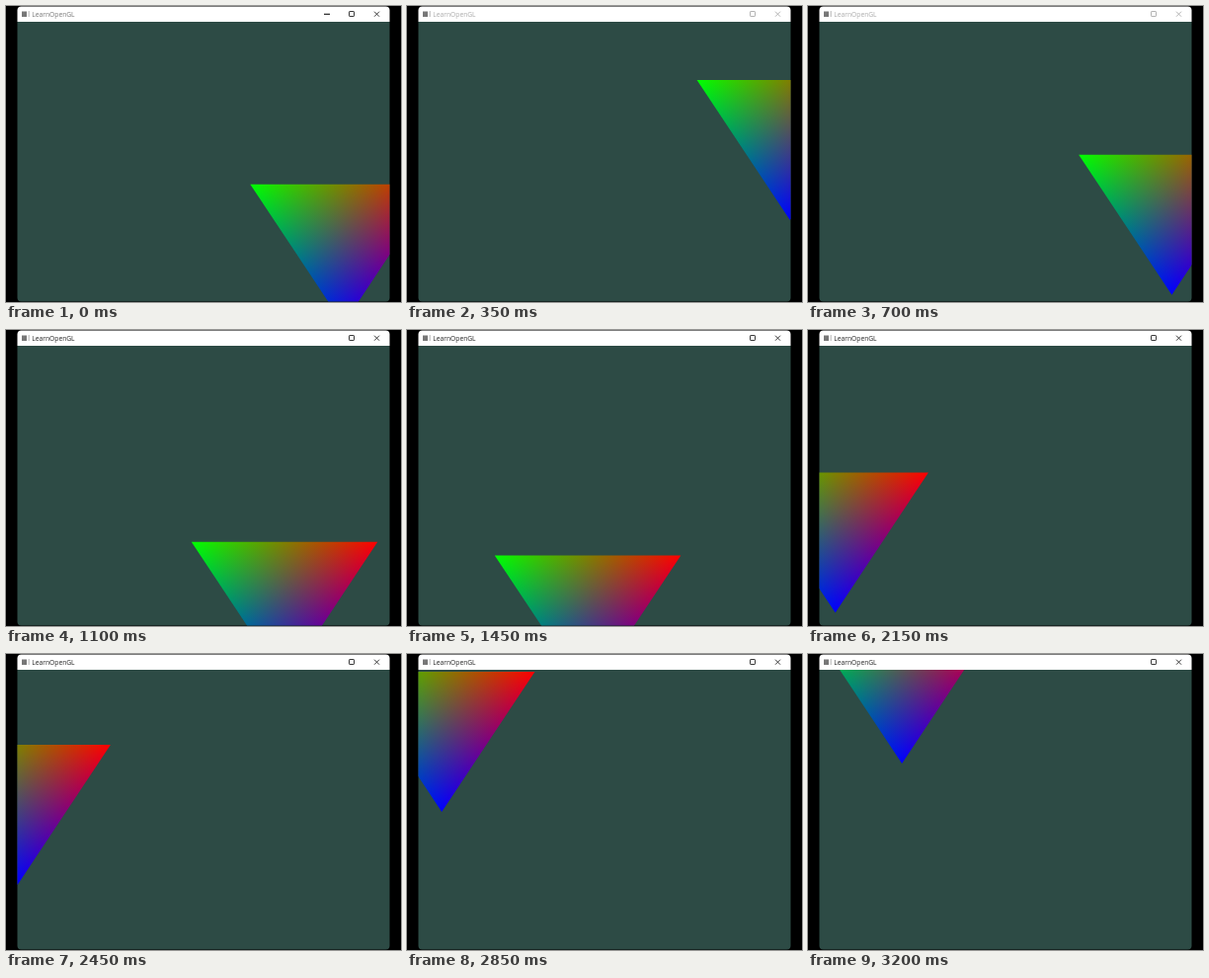
Recreate the animation shown at these times as an HTML page with a canvas. Size 400 px wide and 300 px high, loop 3250 ms.

```html
<!DOCTYPE html>
<html lang="en">
<head>
<meta charset="utf-8">
<title>Orbiting triangle</title>
<style>
  html, body { margin: 0; width: 100%; height: 100%; overflow: hidden; background: #000; }
  #stage { position: relative; width: 400px; height: 300px; overflow: hidden; }
  canvas, svg { position: absolute; left: 0; top: 0; width: 400px; height: 300px; }
  text { font: 6.7px "Open Sans", "Noto Sans", sans-serif; }
</style>
</head>
<body>
<div id="stage">
  <canvas id="scene"></canvas>
  <svg viewBox="0 0 400 300">
    <path d="M11.5 16V4.5Q11.5 .5 15.5 .5H384.5Q388.5 .5 388.5 4.5V16Z" fill="#fff"/>
    <rect x="16" y="5.5" width="5" height="5.5" fill="#777"/>
    <path d="M23.2 5V11" stroke="#999" stroke-width=".7"/>
    <g id="chrome" fill="none" stroke-width=".9">
      <text id="title" x="26.3" y="10.9" stroke="none">LearnOpenGL</text>
      <path id="minimize" d="M322 8.3H328" stroke-width="1.2"/>
      <rect x="347.5" y="5.5" width="5" height="5" rx=".6"/>
      <path d="M373 5.7L378 10.7M378 5.7L373 10.7"/>
    </g>
  </svg>
</div>
<script>
const LOOP = 3250, STEP = 50;
const VIEW = { left: 11.5, top: 16, width: 377, height: 283.5 };
const CENTER = [200, 158], HALF = [188.5, 142];

// [ms, orbit angle in degrees, clockwise from the right]
const OPENING = 41.3;
const ORBIT = [[50, -31.8], [700, 26.7], [1100, 64.2], [1750, 121.7],
               [2150, 156.1], [2450, 178], [3200, 236.2], [3250, 240]];

const GREEN = [-HALF[0] / 2, -HALF[1] / 2];
const RED = [HALF[0] / 2, -HALF[1] / 2];
const BLUE = [0, HALF[1] / 2];

const canvas = document.getElementById("scene");
const ctx = canvas.getContext("2d");
const ratio = window.devicePixelRatio || 1;
canvas.width = 400 * ratio;
canvas.height = 300 * ratio;
ctx.scale(ratio, ratio);

// Gradient from the opposite edge to its vertex: one barycentric weight
function weight(vertex, a, b, color) {
  const dx = b[0] - a[0], dy = b[1] - a[1];
  const k = ((vertex[0] - a[0]) * dx + (vertex[1] - a[1]) * dy) / (dx * dx + dy * dy);
  const fill = ctx.createLinearGradient(a[0] + k * dx, a[1] + k * dy, ...vertex);
  fill.addColorStop(0, "#000");
  fill.addColorStop(1, color);
  return fill;
}

const weights = [
  weight(GREEN, RED, BLUE, "#0f0"),
  weight(RED, GREEN, BLUE, "#f00"),
  weight(BLUE, GREEN, RED, "#00f")
];

function angleAt(t) {
  if (t < ORBIT[0][0]) return OPENING;
  const i = ORBIT.findIndex(key => key[0] > t);
  const [t0, a0] = ORBIT[i - 1], [t1, a1] = ORBIT[i];
  return a0 + (a1 - a0) * (t - t0) / (t1 - t0);
}

function drawTriangle(x, y) {
  ctx.translate(x, y);
  ctx.beginPath();
  for (const p of [GREEN, RED, BLUE]) ctx.lineTo(...p);
  ctx.closePath();
  ctx.fillStyle = "#000";
  ctx.fill();
  ctx.globalCompositeOperation = "lighter";
  for (const fill of weights) {
    ctx.fillStyle = fill;
    ctx.fill();
  }
}

const chrome = document.getElementById("chrome");
const title = document.getElementById("title");
const minimize = document.getElementById("minimize");

function drawTitleBar(t) {
  const opening = t < 50;
  const ink = !opening && t < 900 ? "#aaa" : "#222";
  chrome.setAttribute("stroke", ink);
  title.setAttribute("fill", opening ? "#777" : ink);
  minimize.setAttribute("visibility", opening ? "visible" : "hidden");
}

function draw(t) {
  const angle = angleAt(t) * Math.PI / 180;
  ctx.fillStyle = "#000";
  ctx.fillRect(0, 0, 400, 300);
  ctx.save();
  ctx.beginPath();
  ctx.roundRect(VIEW.left, VIEW.top, VIEW.width, VIEW.height, [0, 0, 4, 4]);
  ctx.clip();
  ctx.fillStyle = "#2d4b45";
  ctx.fillRect(0, 0, 400, 300);
  drawTriangle(CENTER[0] + HALF[0] * Math.cos(angle), CENTER[1] + HALF[1] * Math.sin(angle));
  ctx.restore();
  drawTitleBar(t);
}

const start = performance.now();
function tick() {
  const t = (performance.now() - start) % LOOP;
  draw(Math.floor(t / STEP) * STEP);
  requestAnimationFrame(tick);
}
tick();
</script>
</body>
</html>
```
